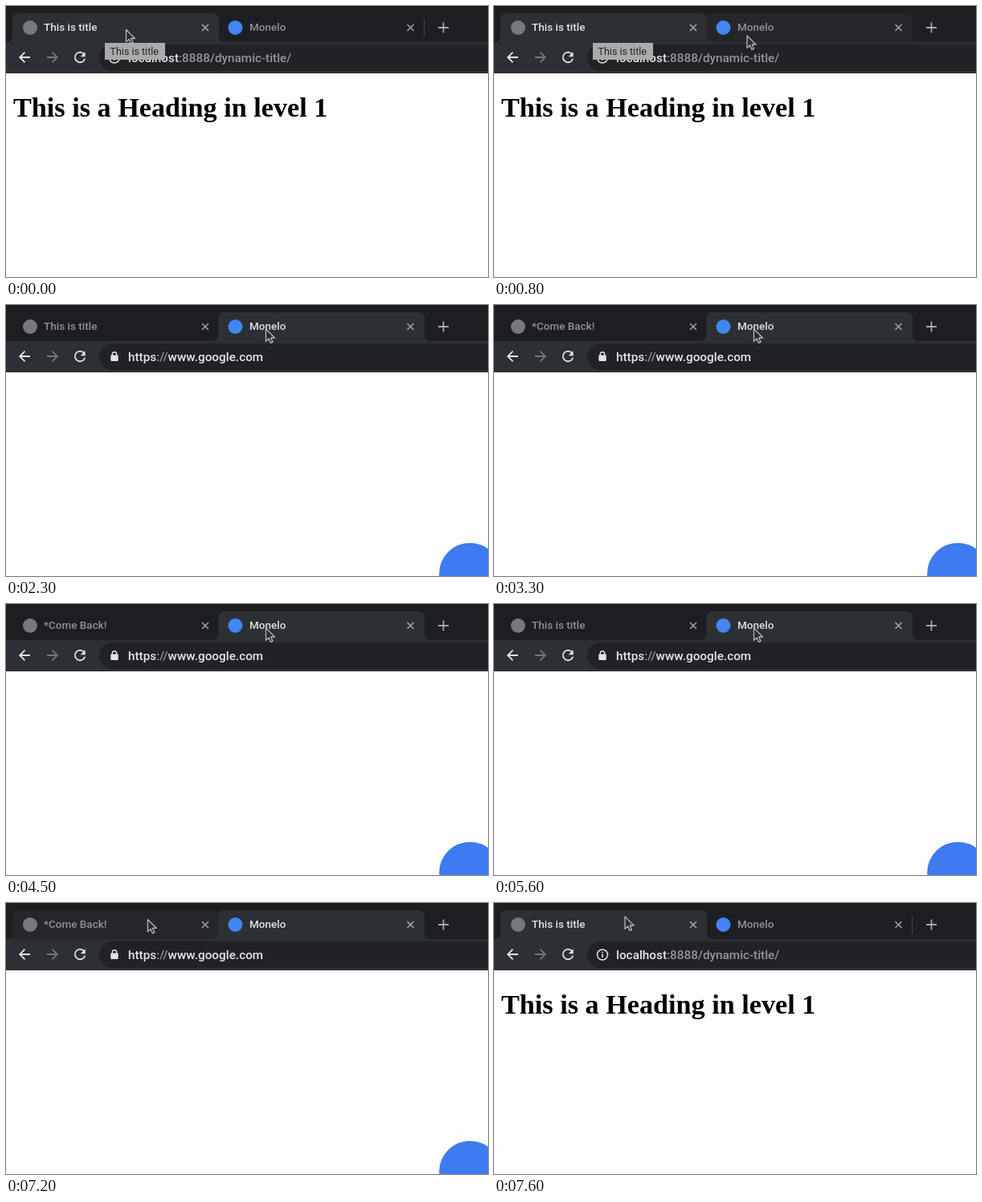
These frames come from a looping animation (600x338 px, 7800 ms). An HTML page:

```html
<!DOCTYPE html>
<html lang="en">
<head>
<meta charset="utf-8">
<title>Dynamic tab title</title>
<style>
  html, body { margin: 0; width: 100%; height: 100%; overflow: hidden; background: #1d1e21; }
  svg { display: block; width: 600px; height: 338px; }
  text { font: 500 13.5px Roboto, Inter, sans-serif; white-space: pre; }
  .url { font-size: 15.3px; fill: #e4e6e8; }
  .dim { fill: #92959a; }
  .line { fill: none; stroke: #e2e4e6; stroke-width: 1.8; }
  .mark { fill: none; stroke: #a4a7ab; stroke-width: 1.5; }
  .heading { font: bold 34.2px "Liberation Serif", "Times New Roman", serif; }
</style>
</head>
<body>
<svg viewBox="0 0 600 338">
  <defs>
    <path id="shape" d="M0 45Q8 45 8 37V17Q8 9 16 9H257Q265 9 265 17V37Q265 45 273 45Z"/>
    <path id="cross" d="M-4 -4L4 4M4 -4L-4 4"/>
    <path id="arrow" d="M6.5 0H-6M0 -6.3L-6.3 0L0 6.3"/>
  </defs>
  <rect width="600" height="338" fill="#1d1e21"/>
  <use id="hover" href="#shape" fill="#242629"/>
  <use id="active" href="#shape" fill="#2c2f33"/>
  <rect y="45" width="600" height="40" fill="#2c2f33"/>
  <rect x="116" y="48" width="520" height="33" rx="16.5" fill="#202225"/>

  <circle cx="30" cy="27" r="9" fill="#77797c"/>
  <circle cx="285.5" cy="27" r="9" fill="#4285f4"/>
  <text id="title" x="47" y="31"></text>
  <text id="other" x="303" y="31">Monelo</text>
  <use href="#cross" class="mark" x="248" y="27"/>
  <use href="#cross" class="mark" x="503.5" y="27"/>
  <path id="divider" d="M520.5 16V38" stroke="#46494d"/>
  <path d="M538 27H551M544.5 20.5V33.5" class="mark" style="stroke-width:1.8"/>

  <use href="#arrow" class="line" x="23.5" y="64"/>
  <use href="#arrow" class="line" transform="translate(57.5 64) scale(-1 1)" style="stroke:#74777b"/>
  <path d="M97 59.9A6.3 6.3 0 1 0 98.2 65.7" class="line"/>
  <path d="M98.7 57.2V63.2H92.7Z" fill="#e2e4e6"/>

  <g id="local">
    <circle cx="135" cy="64.5" r="6.5" class="line" style="stroke-width:1.5"/>
    <path d="M135 63.5V68M135 60.8V62.3" class="line" style="stroke-width:1.6"/>
    <text x="152" y="70" class="url">localhost<tspan class="dim">:8888/dynamic-title/</tspan></text>
    <rect y="84" width="600" height="254" fill="#fefdfe"/>
    <text x="9" y="138" class="heading">This is a Heading in level 1</text>
  </g>
  <g id="search">
    <rect x="130.3" y="62.5" width="9.4" height="7.5" rx="1" fill="#e2e4e6"/>
    <path d="M132.3 63V61.5A2.7 2.7 0 0 1 137.7 61.5V63" class="line" style="stroke-width:1.4"/>
    <text x="152" y="70" class="url">https<tspan class="dim">://</tspan>www.google.com</text>
    <rect y="84" width="600" height="254" fill="#fefdfe"/>
    <circle cx="577.5" cy="335" r="38.3" fill="#3c7bf0"/>
  </g>
  <g id="tip">
    <rect x="123" y="46" width="75" height="21" fill="#aaaaac"/>
    <text x="129.5" y="60.5" style="font-size:12.5px;font-weight:400" fill="#232427">This is title</text>
  </g>
  <path id="cursor" d="M0 0V15.4L3.6 12L6 17.4L8.5 16.3L6.2 11H11Z"
    fill="#2a2c2f" stroke="#b6b8ba" stroke-width="1.3" stroke-linejoin="round"/>
</svg>
<script>
const LOOP = 7800, LEAVE = 1100, RETURN = 7300;
const BLINKS = [2700, 3700, 4500, 5500, 6600];
// Pointer stops: time, x, y
const PATH = [[0, 149.5, 29.5], [800, 315, 37], [1100, 323.5, 30],
  [6300, 323.5, 30], [6500, 322.5, 30], [7300, 170, 20], [7600, 163, 17], [LOOP, 163, 17]];
const $ = id => document.getElementById(id);
const show = (id, on) => $(id).setAttribute("visibility", on ? "visible" : "hidden");
const shift = (id, x, y) => $(id).setAttribute("transform", `translate(${x} ${y})`);

function pointer(t) {
  const i = PATH.findIndex(p => p[0] > t);
  const [t0, x0, y0] = PATH[i - 1], [t1, x1, y1] = PATH[i];
  const u = (t - t0) / (t1 - t0), k = u * u * (3 - 2 * u);
  return [x0 + (x1 - x0) * k, y0 + (y1 - y0) * k];
}

function draw(t) {
  const away = t >= LEAVE && t < RETURN;
  const [x, y] = pointer(t);
  const over = x > 265;
  const hovering = over !== away;
  const blinks = BLINKS.filter(b => t >= b).length;

  shift("cursor", x, y);
  shift("active", away ? 256 : 0, 0);
  shift("hover", over ? 256 : 0, 0);
  show("hover", hovering);
  show("divider", !away && !hovering);
  show("local", !away);
  show("search", away);
  show("tip", t < 1000);
  $("title").textContent = away && blinks % 2 ? "*Come Back!" : "This is title";
  $("title").setAttribute("fill", away ? "#8f9296" : "#e0e2e5");
  $("other").setAttribute("fill", away ? "#e0e2e5" : "#8f9296");
}

const start = performance.now();
function tick() {
  draw((performance.now() - start) % LOOP);
  requestAnimationFrame(tick);
}
tick();
</script>
</body>
</html>
```
